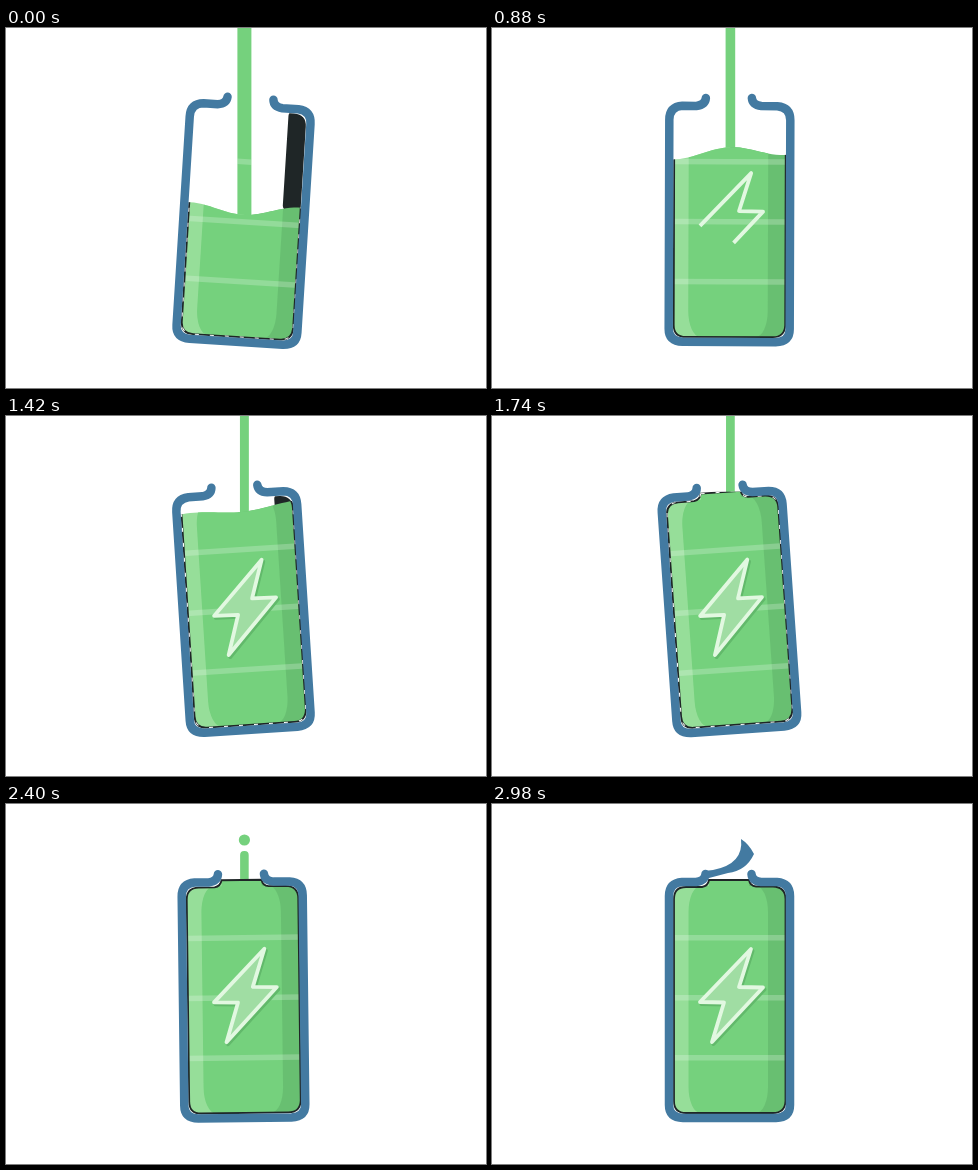
Write an HTML page with a canvas that moves like this. It is 480 by 360 pixels and loops after 3 s.

```html
<!DOCTYPE html>
<html lang="en">
<head>
<meta charset="utf-8">
<title>Filling battery</title>
<style>
html, body { margin: 0; width: 100%; height: 100%; overflow: hidden; background: #fff; }
canvas { display: block; width: 480px; height: 360px; }
</style>
</head>
<body>
<canvas id="stage" width="480" height="360"></canvas>
<script>
const ctx = document.getElementById('stage').getContext('2d');
const LOOP = 3000, FULL = 1800;
const GREEN = '#75d17d', LIGHT = '#96de99', SHADE = '#68bf71';
const BLUE = '#437aa1', DARK = '#1f2627', PALE = '#e2f8e1';
const PERIMETER = 276; // outline length of the bolt

const body = new Path2D('M217 76H257Q258 82 264 82.5H281Q293.5 83 293.5 95V297Q293 309 281 309' +
  'H194Q182 309 182 297V95Q182 83 194 83H210Q216 82 217 76Z');
const shell = new Path2D('M213.5 70Q213 77 204 78H190Q177 79 177 92V301Q177 313.5 191 314' +
  'H284Q298 313.5 298 301V92Q298 79 285 78H269Q260 77 259.5 70');
const bolt = new Path2D('M208 198L259 145L247 183L271 183.5L220 238L232 198.5Z');
const horn = new Path2D('M212 67L221 66Q252 60 249 35Q257 40 262 50Q254 67 236 69L217 74Z');
const panel = new Path2D();
panel.roundRect(196.5, 82, 79.5, 227, { x: 12, y: 26 });
panel.rect(217, 75, 40, 16);

const clamp = v => Math.max(0, Math.min(1, v));
const span = (t, from, to) => clamp((t - from) / (to - from));
const ease = u => u * u * (3 - 2 * u);

// Degrees: swing to the left, then settle upright
function tilt(t) {
  if (t < 1600) return 4 * Math.cos(Math.PI * (t - 200) / 1400);
  return -4 * (1 - ease(span(t, 1800, 2620)));
}

function surfaceAt(x, t) {
  const s = (x - 238) / 55;
  const level = 182 - 110 * span(t, 0, FULL) ** 0.9;
  const slope = 8 * Math.cos(Math.PI * (t - 350) / 900);
  const hump = 5 * Math.cos(2 * Math.PI * t / 1700);
  const calm = ease(span(t, 1500, FULL));
  return level + (slope * s + hump * Math.cos(Math.PI * s)) * (1 - calm);
}

function fill(path, color) {
  ctx.fillStyle = color;
  ctx.fill(path);
}

function stroke(path, color, width, dash = [], offset = 0) {
  ctx.strokeStyle = color;
  ctx.lineWidth = width;
  ctx.setLineDash(dash);
  ctx.lineDashOffset = offset;
  ctx.stroke(path);
}

function scoped(draw) {
  ctx.save();
  draw();
  ctx.restore();
}

function pose(t) {
  ctx.translate(237, 197);
  ctx.rotate(tilt(t) * Math.PI / 180);
  ctx.translate(-237, -197);
}

function stripes() {
  ctx.fillStyle = 'rgba(255, 255, 255, .22)';
  for (let i = 0; i < 3; i++) ctx.fillRect(180, 131 + 60 * i, 116, 5.5);
}

function drawShadow(t) {
  if (Math.abs(tilt(t)) < 1.5) return;
  scoped(() => {
    pose(t);
    ctx.clip(body);
    const strip = new Path2D();
    strip.roundRect(275.5, 80, 20, 100, 5);
    fill(strip, DARK);
  });
}

function drawStream(t) {
  const x = 238.4, w = 8.5 + 5.5 * Math.exp(-t / 550);
  const top = Math.max(-20, (t - 2260) / 3);
  const bottom = Math.max(79, surfaceAt(x, t) + 5);
  const stream = new Path2D();
  if (top < bottom) stream.roundRect(x - w / 2, top, w, bottom - top, [4, 4, 0, 0]);
  const drop = top - 11;
  if (drop < 76) {
    stream.moveTo(x + 5.6, drop);
    stream.arc(x, drop, 5.6, 0, Math.PI * 2);
  }
  fill(stream, GREEN);
  ctx.clip(stream);
  pose(t);
  stripes();
}

function drawBolt(t) {
  const u = span(t, 340, 1240);
  if (!u) return;
  const front = 53 + (PERIMETER - 53) * u ** 1.1;
  const back = 53 * Math.max(0, 1 - 2.3 * u);
  ctx.lineJoin = 'round';
  scoped(() => {
    ctx.globalAlpha = span(t, 1180, 1380);
    ctx.translate(1.5, 2);
    stroke(bolt, '#62b96b', 4);
    ctx.translate(-1.5, -2);
    fill(bolt, '#a0dda3');
  });
  stroke(bolt, PALE, 3.8, u < 1 ? [front - back, 600] : [], -back);
}

function drawLiquid(t) {
  const area = new Path2D();
  for (let x = 160; x <= 320; x += 4) area.lineTo(x, surfaceAt(x, t));
  area.lineTo(320, 340);
  area.lineTo(160, 340);
  scoped(() => {
    ctx.clip(area);
    pose(t);
    scoped(() => {
      ctx.clip(body);
      ctx.fillStyle = LIGHT;
      ctx.fillRect(180, 70, 58, 245);
      ctx.fillStyle = SHADE;
      ctx.fillRect(238, 70, 58, 245);
      fill(panel, GREEN);
      stripes();
    });
    stroke(body, DARK, 1.8);
    if (Math.abs(tilt(t)) > 1.5) stroke(body, '#fff', 1, [4, 11]);
  });
  pose(t);
  ctx.clip(body);
  drawBolt(t);
}

function drawSplash(t) {
  const grow = span(t, 2720, 2840);
  if (!grow) return;
  ctx.translate(213, 74);
  ctx.scale(.25 + .75 * grow, 1.4 * grow - .4 * span(t, 2840, 2970));
  ctx.translate(-213, -74);
  fill(horn, BLUE);
}

function drawShell(t) {
  pose(t);
  ctx.lineCap = 'round';
  stroke(shell, BLUE, 8.5);
  drawSplash(t);
}

function draw(t) {
  ctx.fillStyle = '#fff';
  ctx.fillRect(0, 0, 480, 360);
  for (const part of [drawShadow, drawStream, drawLiquid, drawShell]) scoped(() => part(t));
}

const start = performance.now();
function tick() {
  draw((performance.now() - start) % LOOP);
  requestAnimationFrame(tick);
}
tick();
</script>
</body>
</html>
```
